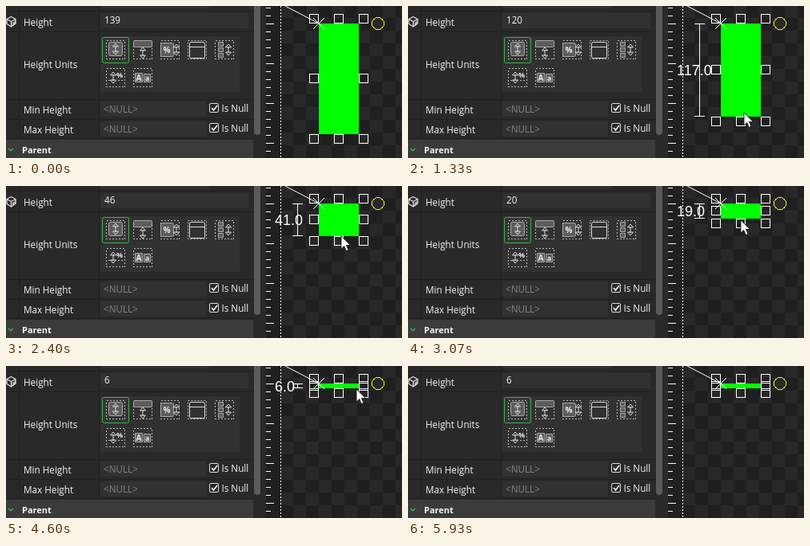
Write an HTML page that moves like this. It is 495x191 px and loops after 6.6 s.

```html
<!DOCTYPE html>
<html lang="en">
<head>
<meta charset="utf-8">
<title>Resizing a rectangle</title>
<style>
html, body { margin: 0; width: 100%; height: 100%; overflow: hidden; background: #222; }
svg { display: block; }
.ui { font: 11.7px "Open Sans", "Noto Sans", sans-serif; fill: #f4f4f4; }
.hint { fill: #858585; }
.measure { font: 18px "Liberation Sans", Arial, sans-serif; fill: #fff; }
.line { fill: none; stroke: #fff; }
.crisp { shape-rendering: crispEdges; }
.icon { fill: none; stroke: #dedede; }
.icon .solid { fill: #5c5c5c; stroke: #aaa; }
.icon .head { fill: #eee; stroke: none; }
.icon text { font: bold 10px "Open Sans", sans-serif; fill: #eee; stroke: none; text-anchor: middle; }
.dash { stroke: #bbb; stroke-dasharray: 2 2; }
</style>
</head>
<body>
<svg width="495" height="191" viewBox="0 0 495 191">
  <defs>
    <pattern id="checker" width="32" height="32" x="343" y="-1" patternUnits="userSpaceOnUse">
      <path fill="#1f1f1f" d="M0 0H32V32H0z"/>
      <path fill="#282828" d="M0 0H16V16H0zM16 16H32V32H16z"/>
    </pattern>
    <g id="updown">
      <path d="M0-4V4"/>
      <path class="head" d="M-3.500-3L0-7L3.500-3zM-3.500 3L0 7L3.500 3z"/>
    </g>
    <rect id="frame" class="dash crisp" x="-11.5" y="-11.5" width="23" height="23"/>
  </defs>

  <!-- Property panel -->
  <path fill="#292929" d="M0 0H318V191H0z"/>
  <path fill="#313131" d="M118 0H254V3H118zM118 9H303V28H118zM118 120H250V139H118zM118 145H250V164H118zM118 38H292V108H118z"/>
  <path stroke="#202020" d="M0 6.5H309M0 32.5H309M0 117.5H309M0 142.5H309M0 166.5H309M16.5 0V167M116.5 0V167"/>
  <path fill="#3b3b3b" d="M0 168H309V191H0z"/>
  <path fill="#5a5a5a" d="M310 0H318V158Q318 162 314 162T310 158z"/>
  <rect x="120.5" y="39.5" width="33" height="32" rx="2" fill="#353535" stroke="#3faf4c"/>

  <g class="icon" stroke-linejoin="round">
    <path stroke-width="1.3" d="M1 16.500L6.500 13.500L12 16.500V22L6.500 26L1 22.500zM1 16.500L6.500 19.500L12 16.500M6.500 19.500V26M8 22L12 19.500M8 24L12 21.500"/>
    <g transform="translate(137 55)">
      <use href="#frame"/><rect class="solid" x="-8.500" y="-9.500" width="17" height="17" rx="2"/><use href="#updown" y="-1"/>
    </g>
    <g transform="translate(171 55)">
      <use href="#frame"/><rect class="solid" x="-11.500" y="-11.500" width="23" height="8" rx="1"/>
      <use href="#updown" y="4"/>
    </g>
    <g transform="translate(205 55)">
      <use href="#frame"/><rect class="solid" x="-11.500" y="-8.500" width="16" height="17" rx="2"/>
      <text x="-4" y="4">%</text><use href="#updown" x="8"/>
    </g>
    <g transform="translate(239 55)">
      <rect class="dash" x="-11.500" y="-11.500" width="23" height="23"/>
      <rect x="-9.500" y="-9.500" width="19" height="20" rx="2"/><path d="M-9.500-3.500H9.500"/>
    </g>
    <g transform="translate(273 55)">
      <use href="#frame"/>
      <path class="solid" d="M-7.500-9.500h6v5h-6zM-7.500-2.500h6v5h-6zM-7.500 4.500h6v5h-6z"/><use href="#updown" x="5"/>
    </g>
    <g transform="translate(137 90)">
      <use href="#frame"/><use href="#updown" x="-3"/><path class="dash" d="M-9 3.500H9"/>
      <text x="5" y="0" style="font-size:9px">%</text>
    </g>
    <g transform="translate(171 90)">
      <use href="#frame"/>
      <path class="solid" d="M-9.500-5.500H-.5V5.500H-9.500zM1.500-4.500H9.500V5.500H1.500z"/>
      <text x="-5" y="4">A</text><text x="5.500" y="4" style="font-size:9px">a</text>
    </g>
  </g>

  <g class="ui">
    <text x="22" y="25">Height</text>
    <text id="field" x="123" y="22"></text>
    <text x="22" y="78">Height Units</text>
    <text x="22" y="135">Min Height</text>
    <text x="22" y="160">Max Height</text>
    <g id="nullRow">
      <text class="hint" x="122" y="134">&lt;NULL&gt;</text>
      <rect x="254.500" y="122.500" width="11" height="11" rx="1.500" fill="none" stroke="#ddd"/>
      <path class="line" stroke-width="1.500" d="M257 128L259.500 131L264 125"/>
      <text x="269.500" y="133">Is Null</text>
    </g>
    <use href="#nullRow" y="25"/>
    <text x="20" y="185" font-weight="700" font-size="11">Parent</text>
    <path d="M3 179L6 182L9 179" fill="none" stroke="#4fb84f" stroke-width="1.200"/>
  </g>

  <!-- Canvas and ruler -->
  <path fill="#292929" d="M318 0H325V191H318z"/>
  <path fill="#202020" d="M325 0H343V191H325z"/>
  <path id="ticks" class="line crisp"/>
  <path fill="url(#checker)" d="M343 0H495V191H343z"/>
  <path class="line crisp" stroke-dasharray="2 2" d="M343.500 0V191"/>
  <rect id="box" x="391" y="22" width="50" fill="#0f0"/>
  <path id="handles" class="line crisp"/>
  <path class="line" d="M349 0L391 22M384 15L398 29M384 29L398 15"/>
  <circle class="crisp" cx="465" cy="22" r="7.500" fill="none" stroke="#ff0"/>
  <g id="measure">
    <path id="span" class="line crisp"/>
    <text id="size" class="measure" x="336"></text>
  </g>
  <path id="cursor" fill="#fff" stroke="#111" stroke-width=".8" d="M0 0V16L3.700 12.500L6.300 18.500L9 17.300L6.400 11.500H11.500z"/>
</svg>
<script>
const LOOP = 6600, FPS = 15, TOP = 22;
const el = id => document.getElementById(id);

// Keys are [step, value...] at 15 steps per second.
const heightKeys = [
  [12, 139], [15, 135], [19, 120], [20, 117], [23, 100], [28, 75], [29, 72],
  [33, 55], [37, 36], [40, 25], [42, 20], [45, 20], [46, 19], [52, 15],
  [56, 15], [60, 11], [65, 6]
];
const cursorKeys = [
  [0, 433, 193], [1, 431, 188], [4, 424, 175], [8, 419, 168], [12, 419, 168],
  [20, 420, 134], [23, 420, 116], [29, 421, 90], [33, 420, 72], [42, 416, 44],
  [46, 416, 43], [52, 418, 38], [56, 426, 38], [65, 437, 29], [68, 437, 29],
  [69, 438, 29], [80, 438, 29], [82, 400, 56], [85, 250, 130], [89, 90, 195]
];

function sample(keys, step) {
  const i = keys.findIndex(key => key[0] >= step);
  if (i < 0) return keys.at(-1).slice(1);
  if (i === 0) return keys[0].slice(1);
  const a = keys[i - 1], b = keys[i];
  const p = (step - a[0]) / (b[0] - a[0]);
  return a.slice(1).map((v, n) => v + (b[n + 1] - v) * p);
}

const heightAt = step => Math.round(sample(heightKeys, step)[0]);
const show = (node, visible) => node.setAttribute("visibility", visible ? "visible" : "hidden");

function handlePath(height) {
  const rows = [10.5, TOP + Math.floor(height / 2) - 5.5, TOP + height + .5];
  let path = "";
  rows.forEach((y, row) => [379.5, 410.5, 441.5].forEach((x, col) => {
    if (row !== 1 || col !== 1) path += `M${x} ${y}h11v11h-11z`;
  }));
  return path;
}

function draw(time) {
  // The small lead keeps each step on its 10 ms rounded start.
  const step = Math.floor((time % LOOP + 3.4) * FPS / 1000) % (LOOP * FPS / 1000);
  const height = heightAt(step), bottom = TOP + height;
  const [x, y] = sample(cursorKeys, step).map(Math.round);

  // The text field trails the drag by one step.
  el("field").textContent = heightAt(step - 1);
  el("box").setAttribute("height", height);
  el("handles").setAttribute("d", handlePath(height));
  el("span").setAttribute("d", `M358 22.5H371M364.5 22V${bottom}M358 ${bottom - .5}H371`);
  el("size").textContent = height.toFixed(1);
  el("size").setAttribute("y", Math.round(TOP + height / 2 + 6.5));
  el("cursor").setAttribute("transform", `translate(${x} ${y})`);
  show(el("measure"), step >= 4 && step < 82);
  show(el("cursor"), step >= 1 && step < 89);
}

let ticks = "";
for (let i = 0; i < 20; i++) ticks += `M325 ${i * 10 + 2.5}h${i % 5 === 2 ? 10 : 6}`;
el("ticks").setAttribute("d", ticks);

function loop() {
  draw(performance.now());
  requestAnimationFrame(loop);
}
loop();
</script>
</body>
</html>
```
